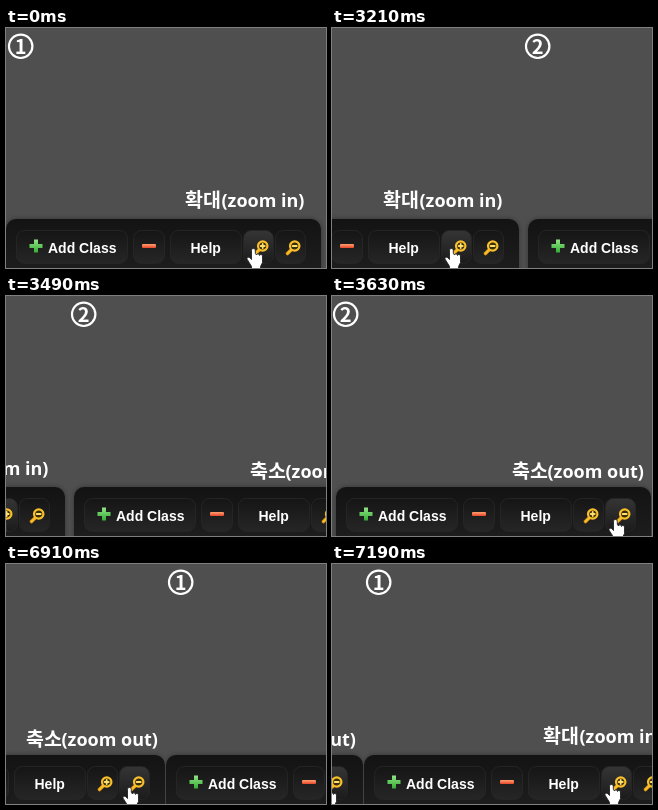
An HTML page for the animation above (7260 ms loop, 320 px wide and 240 px high).

```html
<!DOCTYPE html>
<html lang="ko">
<head>
<meta charset="utf-8">
<title>Zoom toolbar</title>
<style>
  html, body { margin: 0; width: 100%; height: 100%; overflow: hidden; background: #4f4f4f; }
  #stage { display: block; width: 100vw; height: 100vh; }
  text { fill: #fff; }
  .digit { font: 700 20px "Noto Sans CJK KR", "Noto Sans CJK JP", "Noto Sans CJK", sans-serif; text-anchor: middle; }
  .hangul { font: 700 19.5px "Noto Sans CJK KR", "Noto Sans CJK JP", "Noto Sans CJK", sans-serif; }
  .latin { font: 700 18px "Open Sans", "Noto Sans", sans-serif; }
  .label { font: 700 14px "Liberation Sans", Arial, sans-serif; }
</style>
</head>
<body>
<svg id="stage" viewBox="0 0 320 240" preserveAspectRatio="none">
  <defs>
    <linearGradient id="panel" x2="0" y2="1"><stop stop-color="#131313"/><stop offset="1" stop-color="#202020"/></linearGradient>
    <linearGradient id="button" x2="0" y2="1"><stop stop-color="#151515"/><stop offset="1" stop-color="#262626"/></linearGradient>
    <linearGradient id="hover" x2="0" y2="1"><stop stop-color="#353535"/><stop offset="1" stop-color="#1b1b1b"/></linearGradient>
    <linearGradient id="green" x2="0" y2="1"><stop stop-color="#92e486"/><stop offset="1" stop-color="#35ad35"/></linearGradient>
    <linearGradient id="red" x2="0" y2="1"><stop stop-color="#ffa070"/><stop offset="1" stop-color="#e8472a"/></linearGradient>
    <filter id="soft" x="-10%" y="-20%" width="120%" height="140%"><feGaussianBlur stdDeviation="2.5"/></filter>
    <g id="lens" fill="none" stroke="#f8c02c" stroke-linecap="round">
      <path d="M-3 3L-6.500 6.500" stroke="#dc930f" stroke-width="3.6"/>
      <path d="M-3 3L-6.500 6.500" stroke-width="1.8"/>
      <circle r="4.7" cx=".7" cy="-1" fill="#3a2e0a" stroke-width="2.2"/>
      <path d="M-1.300 -1H2.700" stroke="#ffe070" stroke-width="1.8"/>
    </g>
    <path id="hand" d="M0 0c-1.4 0-2 .9-2 2v9l-1.6-1.7c-1-1-2.6-.8-2.9.2-.2.6 0 1.2.5 1.9l4 6.4V22H7v-4l2-4V7.500c0-2-2.700-2-3-.5 0-2-2.800-2.300-3.200-.5C2.500 5 1.800 5 1.800 5V2C1.800 .9 1.200 0 0 0Z"
      fill="#fff" stroke="#222" stroke-width=".9"/>
  </defs>
</svg>
<script>
const HOLD = 3000, STEP = 70, WIDTH = 320, SHIFT = 32, LOOP = 7260;
const HALF = HOLD + 9 * STEP;
const stage = document.getElementById('stage');

const button = (x, width, fill = 'button') =>
  `<rect x="${x + .5}" y="202.500" width="${width - 1}" height="33" rx="8" fill="url(#${fill})" stroke="#252525"/>`;

const toolbar = (x, hovered) => `<g transform="translate(${x})">
  <rect y="191" width="315" height="65" rx="10" opacity=".35" filter="url(#soft)"/>
  <rect y="191" width="315" height="65" rx="10" fill="url(#panel)"/>
  ${button(10, 112)}${button(127, 32)}${button(164, 72)}
  ${button(237, 31, hovered === 'in' ? 'hover' : 'button')}
  ${button(269, 31, hovered === 'out' ? 'hover' : 'button')}
  <path d="M28 211.500h4v4.500h4.500v4h-4.500v4.500h-4v-4.500h-4.500v-4h4.500Z" fill="url(#green)"/>
  <text class="label" x="42" y="225">Add Class</text>
  <rect x="136" y="216" width="14" height="4" rx="1" fill="url(#red)"/>
  <text class="label" x="184.500" y="225">Help</text>
  <use href="#lens" x="256" y="219"/>
  <path d="M256.700 216v4" stroke="#ffe070" stroke-width="1.8" stroke-linecap="round"/>
  <use href="#lens" x="288" y="219"/>
</g>`;

function addSlide({ digit, center, hangul, latin, textX, baseline, barX, hovered, hand }) {
  const slide = document.createElementNS('http://www.w3.org/2000/svg', 'svg');
  slide.setAttribute('width', WIDTH);
  slide.setAttribute('height', 240);
  slide.innerHTML = `
    <circle cx="${center}" cy="18.300" r="11.700" fill="none" stroke="#fff" stroke-width="2.2"/>
    <text class="digit" x="${center}" y="25.500">${digit}</text>
    <text class="hangul" x="${textX}" y="${baseline}">${hangul}</text>
    <text class="latin" x="215.500" y="${baseline}">${latin}</text>
    ${toolbar(barX, hovered)}
    <use href="#hand" x="${hand[0]}" y="${hand[1]}"/>`;
  return stage.appendChild(slide);
}

const slides = [
  addSlide({ digit: 1, center: 14.7, hangul: '확대', latin: '(zoom in)', textX: 179, baseline: 179,
    barX: 0, hovered: 'in', hand: [247.5, 220.5] }),
  addSlide({ digit: 2, center: 13.7, hangul: '축소', latin: '(zoom out)', textX: 180, baseline: 182,
    barX: 4, hovered: 'out', hand: [283.5, 223.5] })
];

function draw(now) {
  const time = now % LOOP;
  const current = time < HALF ? 0 : 1;
  const elapsed = time - current * HALF - HOLD;
  const shift = elapsed < 0 ? 0 : SHIFT * (Math.floor(elapsed / STEP) + 1);
  slides[current].setAttribute('x', -shift);
  slides[1 - current].setAttribute('x', WIDTH - shift);
}

const start = performance.now();
function tick() {
  draw(performance.now() - start);
  requestAnimationFrame(tick);
}
tick();
</script>
</body>
</html>
```
